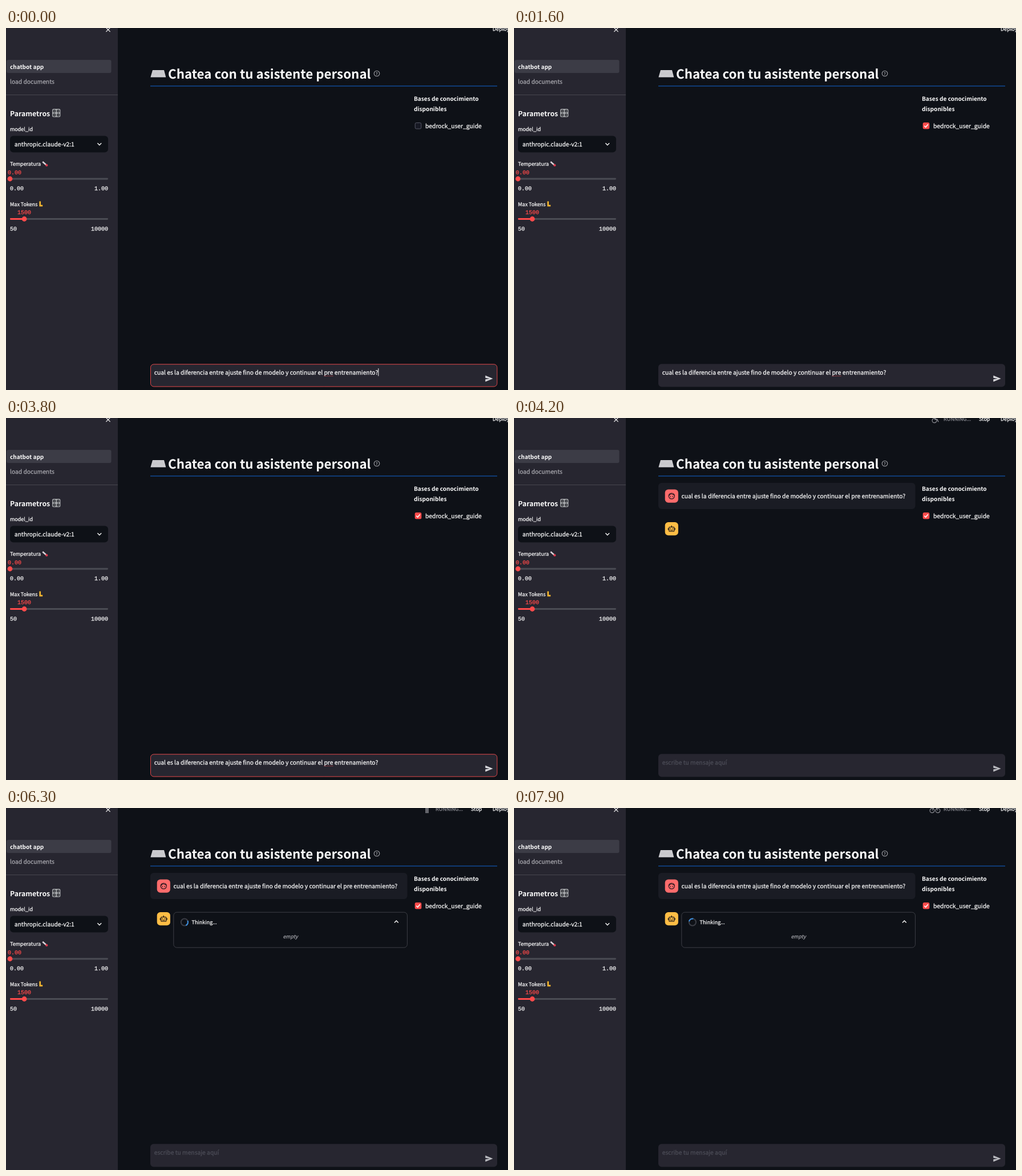
An HTML page with a canvas for the animation above (8000 ms loop, 880 by 636 pixels).

```html
<!DOCTYPE html>
<html lang="es">
<head>
<meta charset="utf-8">
<title>Chatbot</title>
<style>
html, body { margin: 0; width: 100%; height: 100%; overflow: hidden; background: #0e1117; }
canvas { display: block; width: 880px; height: 636px; }
</style>
</head>
<body>
<canvas id="stage"></canvas>
<script>
const LOOP = 8000, STEP = 100;
const CHECK = 800, FOCUS = 3300, SEND = 4000, REPLY = 4100, THINK = 5100;
const SANS = '"Noto Sans CJK SC", "Noto Sans CJK JP", "Noto Sans CJK KR", "Noto Sans", sans-serif';
const MONO = '"Liberation Mono", "DejaVu Sans Mono", monospace';
const BG = '#0e1117', PANEL = '#272630', WHITE = '#fafafa', RED = '#ff4b4b', GREY = '#8d8e95';
const BODY = 10.3, SMALL = 9, RADIUS = 5.7;
const LEAD = 'cual es la diferencia entre ajuste fino de modelo y continuar el ';
const QUESTION = LEAD + 'pre entrenamiento?';

const canvas = document.getElementById('stage');
const dpr = window.devicePixelRatio || 1;
canvas.width = 880 * dpr;
canvas.height = 636 * dpr;
const c = canvas.getContext('2d');
c.scale(dpr, dpr);
c.textRendering = 'geometricPrecision';

const clamp = v => Math.max(0, Math.min(1, v));

function paint(fill, stroke, lw = 1) {
  if (fill) { c.fillStyle = fill; c.fill(); }
  if (stroke) { c.strokeStyle = stroke; c.lineWidth = lw; c.stroke(); }
}

// Regular text gets a hairline outline to reach a medium weight.
function text(str, x, y, { size = BODY, color = WHITE, style = '', align = 'left', family = SANS } = {}) {
  c.font = `${style} ${size}px ${family}`;
  c.textAlign = align;
  c.fillStyle = c.strokeStyle = color;
  c.fillText(str, x, y);
  if (style !== 'bold') {
    c.lineWidth = 0.25;
    c.strokeText(str, x, y);
  }
}

const bold = (str, x, y, size) => text(str, x, y, { size, style: 'bold' });
const small = (str, x, y, color) => text(str, x, y, { size: SMALL, color });
const mono = (str, x, y, color, align) => text(str, x, y, { size: 10, color, align, family: MONO });

function widthOf(str) {
  c.font = `${BODY}px ${SANS}`;
  return c.measureText(str).width;
}

function box(x, y, w, h, r, fill, stroke, lw) {
  c.beginPath();
  c.roundRect(x, y, w, h, r);
  paint(fill, stroke, lw);
}

function path(pts, stroke, lw, fill) {
  c.beginPath();
  for (const [x, y] of pts) c.lineTo(x, y);
  paint(fill, stroke, lw);
}

function circle(x, y, r, fill, stroke, lw, from = 0, sweep = Math.PI * 2) {
  c.beginPath();
  c.arc(x, y, r, from, from + sweep);
  paint(fill, stroke, lw);
}

// dir 1 points down, -1 points up
function chevron(x, y, dir) {
  path([[x - 3.4, y - 1.7 * dir], [x, y + 1.7 * dir], [x + 3.4, y - 1.7 * dir]], WHITE, 1.4);
}

function slider(y, share, low, high, value) {
  const x = 7 + 172 * share;
  mono(value, Math.max(x, 15), y - 8.4, RED, 'center');
  box(7, y - 1.4, 172, 2.8, 1.4, '#4b4c54');
  box(7, y - 1.4, x - 7, 2.8, 1.4, RED);
  circle(x, y, 4.4, RED);
  mono(low, 7, y + 20);
  mono(high, 179, y + 20, WHITE, 'right');
}

function knobsIcon(x, y) {
  box(x - 7.2, y - 7.2, 14.4, 14.4, 2.5, '#a9abae');
  for (const dx of [-3.4, 3.4]) for (const dy of [-3.4, 3.4]) {
    circle(x + dx, y + dy, 2.7, '#3a3b40');
    circle(x + dx, y + dy, 1, '#77797e');
  }
}

function sidebar() {
  c.fillStyle = PANEL;
  c.fillRect(0, 0, 196, 636);
  for (const s of [-1, 1]) path([[179 - 3.6, 3 - 3.6 * s], [179 + 3.6, 3 + 3.6 * s]], WHITE, 1.2);
  box(1, 56, 183.5, 23, 3, '#3c3c46');
  bold('chatbot app', 7, 72, 10);
  text('load documents', 7, 97.5, { color: '#a9a9af' });
  c.fillStyle = '#47474f';
  c.fillRect(0, 117, 196, 1);
  bold('Parametros', 7, 154.6, 12.3);
  knobsIcon(88.2, 149.3);
  small('model_id', 7, 181.2);
  box(7, 189.5, 172, 29, RADIUS, BG);
  text('anthropic.claude-v2:1', 14.7, 208);
  chevron(163.8, 204, 1);

  small('Temperatura', 7, 242);
  path([[64.2, 235], [71, 241]], '#d9d3d8', 2.6);
  circle(71.3, 241.2, 2.1, '#d8394c');
  slider(265, 0, '0.00', '1.00', '0.00');

  small('Max Tokens', 7, 313);
  path([[59.7, 304.5], [59.7, 312.2], [64.2, 312.2]], '#f3b52f', 2.7);
  slider(335.5, 1450 / 9950, '50', '10000', '1500');
}

function keyboardIcon() {
  path([[257, 74], [277, 74], [280.3, 86.5], [253.4, 86.5]], null, 0, '#d6d6d9');
  c.setLineDash([1.6, 0.7]);
  for (let i = 0; i < 4; i++) {
    const y = 76.2 + i * 2.6, half = 9.8 + i * 0.7;
    path([[267 - half, y], [267 + half, y]], '#b0b0b5', 1.2);
  }
  c.setLineDash([]);
}

function header(checked) {
  keyboardIcon();
  bold('Chatea con tu asistente personal', 284, 89, 22.3);
  circle(650, 80, 4.8, null, '#a0a1a7', 1.1);
  text('?', 650, 82.6, { size: 7, color: '#a0a1a7', align: 'center' });
  c.fillStyle = '#114a94';
  c.fillRect(253, 101.2, 608, 1.5);
  bold('Bases de conocimiento', 715, 128, 10.1);
  bold('disponibles', 715, 146, 10.1);
  if (checked) {
    box(716.7, 166, 11.6, 11.6, 2.5, RED);
    path([[719.3, 171.8], [721.6, 174.2], [725.8, 169.3]], '#fff', 1.6);
  } else {
    box(717.2, 166.5, 10.6, 10.6, 2.2, '#171924', '#565866');
  }
  text('bedrock_user_guide', 735, 175.8);
  small('Deploy', 853, 5);
}

// Wheelchair, bicycle, then a walker whose stride closes to a stand.
function sportFigure(k) {
  const wheel = x => circle(x, 4.5, 3.9, null, GREY, 1.2);
  if (k === 0) {
    wheel(737);
    path([[737, -2], [738, 2.5], [742, 2.5], [744, 7]], GREY, 1.4);
  } else if (k === 1) {
    wheel(733);
    wheel(743);
    path([[733, 4.5], [736, -1], [740, -1], [743, 4.5]], GREY, 1.1);
  } else {
    const stride = 1.5 + (5 - k) * 1.5;
    for (const s of [-1, 1]) path([[738 + s * 1.5, -2], [738 + s * stride, 9]], GREY, 2);
  }
}

function runStatus(t) {
  sportFigure(Math.max(0, Math.floor((t - REPLY) / 200)) % 6);
  small('RUNNING...', 753, 5, GREY);
  small('Stop', 815, 5);
}

function avatar(y, color) {
  box(264.7, y - 11.6, 23.2, 23.2, RADIUS, color);
}

function eyes(y, ink) {
  for (const s of [-1, 1]) circle(276.3 + s * 2, y, 0.85, ink);
}

function userIcon(y) {
  const ink = '#26161d';
  avatar(y, '#ff6c6c');
  circle(276.3, y, 5.1, null, ink, 1.2);
  path([[271.4, y - 0.5], [275.2, y - 4], [281.2, y - 1.6]], ink, 1.1);
  eyes(y + 1, ink);
}

function botIcon(y) {
  const ink = '#2a2118';
  avatar(y, '#ffbd45');
  box(271.8, y - 3, 9, 7.6, 1, null, ink, 1.3);
  path([[276.3, y - 3], [276.3, y - 5.6]], ink, 1.6);
  for (const s of [-1, 1]) path([[276.3 + s * 5.8, y - 1], [276.3 + s * 5.8, y + 2]], ink, 1.6);
  eyes(y - 0.3, ink);
  path([[273.8, y + 2.4], [278.8, y + 2.4]], ink, 1.1);
}

function thinking(t) {
  box(293.8, 183.2, 409.6, 62, RADIUS, null, '#3d3f46');
  const turn = Math.PI * 2 * (t - 5365) / 1000;
  circle(312.9, 200.6, 6.1, null, '#3b3d45', 2.1);
  circle(312.9, 200.6, 6.1, null, '#3b8fe0', 2.1, turn, Math.PI / 2);
  small('Thinking...', 325.5, 204.3);
  chevron(684.3, 199.8, -1);
  text('empty', 498.5, 229, { size: 8.75, color: '#a0a1a7', style: 'italic', align: 'center' });
}

function chat(t) {
  box(253, 114, 450.5, 46, RADIUS, '#1a1c24');
  userIcon(137.1);
  text(QUESTION, 293.5, 141.2);
  botIcon(194.6);
  if (t >= THINK) thinking(t);
}

function focusAlpha(t) {
  const blur = t < FOCUS ? 600 : SEND - 100;
  const rise = t < FOCUS ? 1 : clamp(0.65 + (t - FOCUS) / 500);
  return rise * (1 - clamp((t - blur) / 250));
}

function chatInput(t) {
  const x = 259.7, typed = t < SEND;
  box(253, 590.3, 608, 40.2, RADIUS, PANEL);
  c.globalAlpha = focusAlpha(t) * 0.85;
  box(253.5, 590.8, 607.4, 39.2, RADIUS, null, RED);
  c.globalAlpha = 1;
  if (typed) {
    const from = x + widthOf(LEAD);
    text(QUESTION, x, 609);
    c.setLineDash([1.4, 1]);
    path([[from, 611.4], [from + widthOf('pre'), 611.4]], '#d8444a', 0.9);
    c.setLineDash([]);
  } else {
    text('escribe tu mensaje aquí', x, 609, { color: '#4d4e58' });
  }
  if (t < 100 || (t >= FOCUS && t < FOCUS + 500)) {
    c.fillStyle = WHITE;
    c.fillRect(x + widthOf(QUESTION), 598, 1, 13.5);
  }
  const arrow = [[840.3, 610.6], [853.6, 616], [840.3, 621.4], [840.3, 617.3], [848, 616], [840.3, 614.7]];
  path(arrow, null, 0, typed ? '#d8d8dc' : '#b9babf');
}

function draw(t) {
  c.fillStyle = BG;
  c.fillRect(0, 0, 880, 636);
  sidebar();
  header(t >= CHECK);
  if (t >= REPLY || (t >= CHECK && t < CHECK + 300)) runStatus(t);
  if (t >= REPLY) chat(t);
  chatInput(t);
}

const start = performance.now();
function tick() {
  const t = (performance.now() - start) % LOOP;
  draw(Math.floor(t / STEP) * STEP);
  requestAnimationFrame(tick);
}
tick();
</script>
</body>
</html>
```
